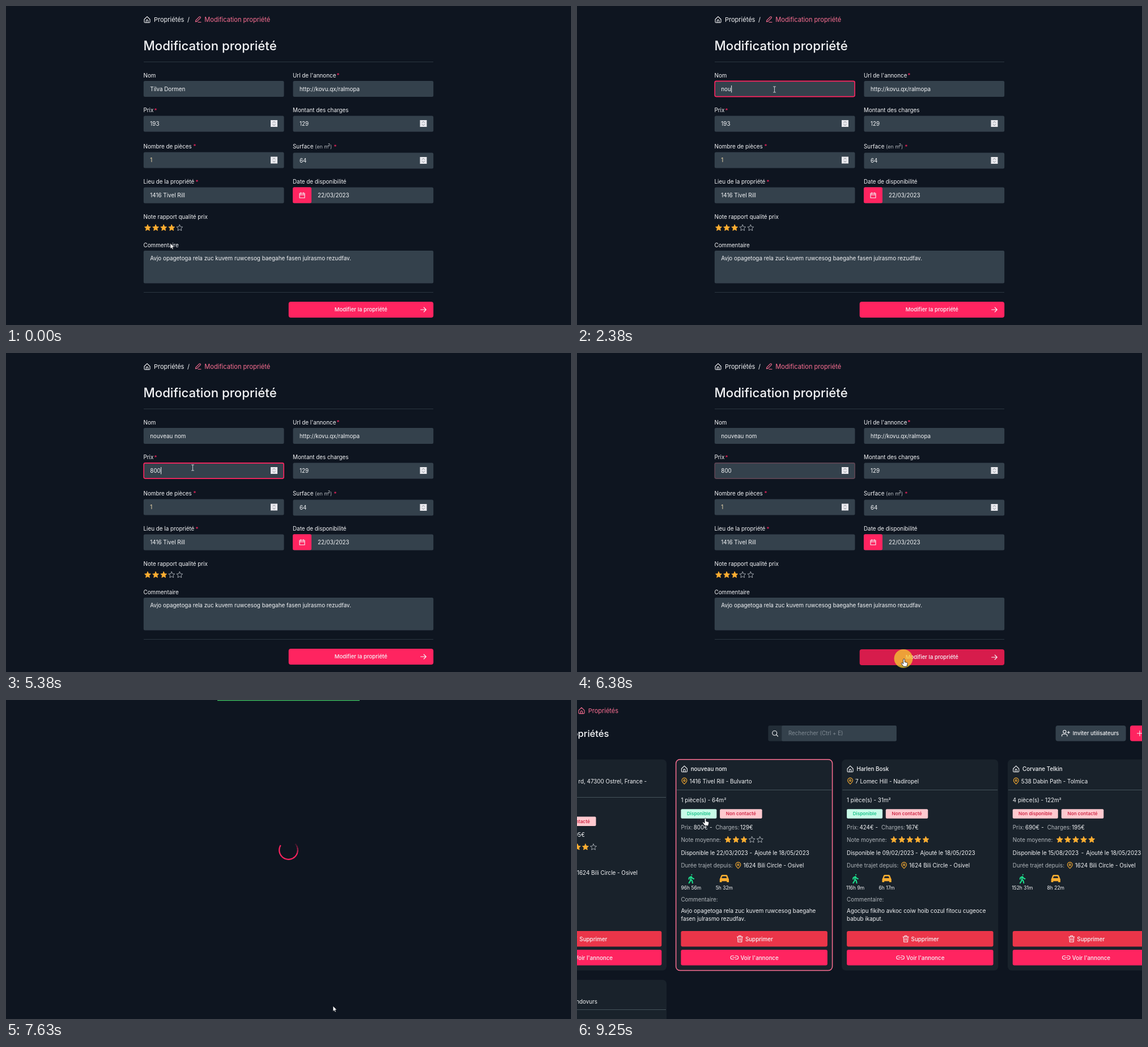
Recreate the animation shown at these times as an HTML page. Size 997x562 px, loop 9370 ms.

```html
<!DOCTYPE html>
<html lang="fr">
<head>
<meta charset="utf-8">
<title>Modification propriété</title>
<style>
  html, body { margin: 0; width: 100%; height: 100%; overflow: hidden; background: #0e1520; }
  svg { display: block; width: 997px; height: 562px; font-family: Inter, "Open Sans", sans-serif; }
</style>
</head>
<body>
<svg id="stage" viewBox="0 0 997 562"></svg>
<script>
const LOOP = 9370, STEP = 125;
const BG = '#0e1520', FIELD = '#34414c', PINK = '#ff2460', ROSE = '#fb6f92', WHITE = '#f4f5f7',
      GRAY = '#b0b5ba', GOLD = '#fcae31', GREEN = '#1edc8c', LINE = '#2b3640';
const SIZE = 9.85;
const NOTE = 'Avjo opagetoga rela zuc kuvem ruwcesog baegahe fasen julrasmo rezudfav.';
const PLACE = '1416 Tivel Rill', WORK = '1624 Bili Circle - Osivel';

const stage = document.getElementById('stage');
const pen = document.createElement('canvas').getContext('2d');
const widthOf = s => { pen.font = `${SIZE}px Inter, "Open Sans", sans-serif`; return pen.measureText(s).width; };

// ---- drawing helpers: y of a text is the middle of its capitals ----
const text = (x, y, s, { size = SIZE, fill = WHITE, weight = 400, anchor = 'start' } = {}) =>
  `<text x="${x}" y="${y + size * .36}" font-size="${size}" fill="${fill}" font-weight="${weight}" text-anchor="${anchor}">${s}</text>`;
const rect = (x, y, w, h, fill, r = 0, extra = '') =>
  `<rect x="${x}" y="${y}" width="${w}" height="${h}" rx="${r}" fill="${fill}" ${extra}/>`;
const line = (x1, x2, y, color = LINE) =>
  `<path d="M${x1} ${y}H${x2}" stroke="${color}"/>`;
const icon = (d, x, y, color = WHITE, fill = 'none', scale = 1, width = 1.1) =>
  `<path d="${d}" transform="translate(${x} ${y}) scale(${scale})" stroke="${color}" fill="${fill}" stroke-width="${width}" stroke-linecap="round" stroke-linejoin="round"/>`;

const HOME = 'M-5 -.5 0 -5.4 5 -.5V4a1.2 1.2 0 0 1-1.2 1.2H-3.8A1.2 1.2 0 0 1-5 4zM-1.6 5V2a1.6 1.6 0 0 1 3.2 0V5';
const PENCIL = 'M-4 1.6 2 -4.4a1.4 1.4 0 0 1 2 2L-2 3.6-4.6 4.3zM0 5H5';
const PIN = 'M0 5.2C-3 2.4-4.4 .8-4.4-1.2a4.4 4.4 0 0 1 8.8 0C4.4.8 3 2.4 0 5.2zM-1.5-1.1a1.5 1.5 0 1 0 3 0a1.5 1.5 0 1 0-3 0';
const CALENDAR = 'M-4.5-3.5h9v8h-9zM-4.5-.8h9M-2.3-5v2.4M2.3-5v2.4';
const ARROW_RIGHT = 'M-4.8 0H4.8M.8-4 4.8 0 .8 4';
const CHEVRONS = 'M-2-1.6 0-3.6 2-1.6M-2 1.6 0 3.6 2 1.6';
const GLASS = 'M3.2-.8a4 4 0 1 1-8 0a4 4 0 1 1 8 0M2.2 2.2 5 5';
const USER_PLUS = 'M1-2.8a2.6 2.6 0 1 1-5.2 0a2.6 2.6 0 1 1 5.2 0M-6.4 5V3.8A2.2 2.2 0 0 1-4.2 1.6H.8A2.2 2.2 0 0 1 3 3.8V5M3.4-1.6h4M5.4-3.6v4';
const TRASH = 'M-5-3.6H5M-4-3.6-3.3 5.4H3.3L4-3.6M-1.8-3.6V-5.6H1.8V-3.6M-1.3-1V3M1.3-1V3';
const LINK = 'M-1.5-3H-3.8a3 3 0 0 0 0 6H-1.5M1.5-3H3.8a3 3 0 0 1 0 6H1.5M-3 0H3';
const WALK = 'M0-3.6-.8 1 1.6 3.2 2.4 7M-1 2-1.6 4-3.6 7M0-3.6-3.2-2-3.8.4M.4-3.4 2-1 4.4 0M1-6.8v.1';
const CAR = 'M-8 1.2-7.2-.4-5.4-5A2 2 0 0 1-3.6-6.2H3.6A2 2 0 0 1 5.4-5L7.2-.4 8 1.2V6.4H5.2V4.4H-5.2V6.4H-8z';
const WINDSHIELD = 'M-4.6-1.4H4.6L3.4-4H-3.4z';

const STAR = 'M' + Array.from({ length: 10 }, (_, i) => {
  const a = i * Math.PI / 5 - Math.PI / 2, r = i % 2 ? 2.7 : 5.7;
  return `${(r * Math.cos(a)).toFixed(2)} ${(r * Math.sin(a)).toFixed(2)}`;
}).join('L') + 'z';
const stars = (x, y, n) => [0, 1, 2, 3, 4].map(i =>
  icon(STAR, x + i * 14.1, y, i < n ? GOLD : '#aeb4ba', i < n ? GOLD : 'none', 1, .9)).join('');

// ---- form page ----
function label(x, y, s, starX) {
  return text(x, y, s) + (starX ? text(starX, y + .5, '*', { fill: PINK, anchor: 'middle' }) : '');
}
function field(x, y, value, { border, color } = {}) {
  const edge = border ? rect(x + .4, y + .4, 246.9, 27.2, 'none', 2.5, `stroke="${border}" stroke-width="1.6"`) : '';
  return rect(x, y, 247.7, 28, FIELD, 2.5) + edge + text(x + 11.5, y + 14, value, { fill: color || WHITE });
}
const stepper = (x, y) => rect(x - 6, y - 6, 12, 12, '#e9e9ee') + icon(CHEVRONS, x, y, '#7b8088', 'none', 1, .9);
const caret = (x, y, s) => rect(x + widthOf(s) + .3, y - 6, 1, 12.5, WHITE);
const marked = (x, y, w) => rect(x, y - 6.5, w, 13, ROSE);

function nameField(k) {
  const full = 'nouveau nom', old = 'Tilva Dormen';
  const typed = k < 17 ? 0 : k < 28 ? Math.min(9, k - 16) : Math.min(11, k - 18);
  const value = typed ? full.slice(0, typed) : old;
  let s = field(242.8, 132, '', { border: k >= 9 && k < 37 ? PINK : '' });
  if (k >= 10 && !typed) {
    const from = k === 10 ? widthOf('Tilva ') : 0;
    s += marked(254.3 + from, 146.5, widthOf(old) - from);
  }
  s += text(254.3, 146, value);
  if (typed && (k < 26 || k === 28 || k === 29)) s += caret(254.3, 146, value);
  return s;
}
function priceField(k) {
  const value = k < 41 ? '193' : '800'.slice(0, k - 40);
  const border = k < 35 ? '' : k === 35 ? '#939ca3' : k < 51 ? PINK : k === 51 ? '#5d4453' : '';
  let s = field(242.8, 193.5, '', { border });
  if (k >= 36 && k < 41) s += marked(254.3, 207.5, widthOf(value));
  s += text(254.3, 207.5, value);
  if (k === 35 || (k > 40 && k < 46)) s += caret(254.3, 207, value);
  return s + stepper(473, 207);
}
function form(k) {
  const hover = k >= 49, by = hover ? 522 : 521;
  return icon(HOME, 249, 24) + text(261, 24, 'Propriétés', { size: 11 }) + text(320, 24, '/', { size: 11 }) +
    icon(PENCIL, 339, 23.5, ROSE) + text(350.3, 24, 'Modification propriété', { size: 11.1, fill: ROSE }) +
    text(242.5, 70, 'Modification propriété', { size: 22.2, weight: 500 }) + line(243, 754, 98.5) +
    label(242.5, 122, 'Nom') + nameField(k) +
    label(506, 122, 'Url de l\'annonce', 586) + field(506.5, 132, 'http://kovu.qx/ralmopa') +
    label(242.5, 183.5, 'Prix', 264) + priceField(k) +
    label(506, 183.5, 'Montant des charges') + field(506.5, 193.5, '129') + stepper(736.5, 207) +
    label(242.5, 247, 'Nombre de pièces', 333) + field(242.8, 257.5, '1', { color: '#f3dfb0' }) + stepper(473, 271.5) +
    label(506, 247.5, 'Surface', 581) + text(545, 247.5, '(en m', { size: 9, fill: GRAY }) +
    text(568, 244.5, '2', { size: 6.5 }) + text(572, 247.5, ')', { size: 9, fill: GRAY }) +
    field(506.5, 258.5, '64') + stepper(736.5, 272) +
    label(242.5, 309.5, 'Lieu de la propriété', 337) + field(242.8, 319.5, PLACE) +
    label(506, 309.5, 'Date de disponibilité') + field(506.5, 319.5, '') + rect(506, 319.3, 33, 28, PINK, 2.5) +
    icon(CALENDAR, 522.5, 333.5) + text(550, 333.5, '22/03/2023') +
    label(242.5, 371, 'Note rapport qualité prix') + stars(250, 391, k < 3 ? 4 : 3) +
    label(242.5, 421, 'Commentaire') + rect(242.8, 431, 511.4, 57.5, FIELD, 2.5) + text(254.3, 444.5, NOTE) +
    line(243, 754, 504.5) + rect(498.7, by, 255.5, 28, hover ? '#d71c4c' : PINK, 4) +
    text(626.3, by + 14, 'Modifier la propriété', { size: 9.6, weight: 500, anchor: 'middle' }) +
    icon(ARROW_RIGHT, 736.5, by + 14);
}

// ---- waiting page ----
function loader(k) {
  const point = a => `${498.5 + 16.3 * Math.cos(a)} ${264.5 + 16.3 * Math.sin(a)}`;
  const turn = (k - 61) * Math.PI / 4;
  let s = '';
  for (let i = 0; i < 17; i++) {
    const a = turn + (i * 15 - 43) * Math.PI / 180;
    s += `<path d="M${point(a)}A16.3 16.3 0 0 1 ${point(a + .265)}" fill="none" stroke="${PINK}" stroke-width="2.2" opacity="${Math.min(1, (i + 1) / 5)}"/>`;
  }
  return s + (k === 61 ? rect(373, 0, 251, 1.3, '#3fc463') : '');
}

// ---- list page ----
function badge(x, y, w, s, good) {
  return rect(x, y - 8.2, w, 16.4, good ? '#c8fbe8' : '#ffc9cf', 2) +
    text(x + w / 2, y, s, { size: 8.2, weight: 600, anchor: 'middle', fill: good ? '#1cc48c' : '#cf2a48' });
}
function cardBox(x, y, h, headY, border = 0) {
  return rect(x, y, 276, h, '#19222b', 7) +
    (border ? rect(x, y, 276, h, 'none', 7, `stroke="${ROSE}" stroke-width="1.5" opacity="${border}"`) : '') +
    line(x + 1, x + 275, headY, '#45535b');
}
function actions(x) {
  return rect(x, 407, 258.5, 27.5, '#ea3549', 3) + icon(TRASH, x + 104, 420.8) +
    text(x + 113.5, 421, 'Supprimer', { size: 9.8, weight: 500 }) +
    rect(x, 440, 258.5, 27.5, PINK, 3) + icon(LINK, x + 94.5, 453.8) +
    text(x + 105, 454, 'Voir l\'annonce', { size: 9.8, weight: 500 });
}
function card(left, c, border) {
  const x = left + 8.8, gray = { fill: GRAY };
  const small = { size: 8.5, anchor: 'middle' };
  return cardBox(left, 104.7, 371.8, 158.5, border) +
    icon(HOME, x + 6, 121.5) + text(x + 17.3, 121.5, c.name, { weight: 500 }) +
    icon(PIN, x + 6, 143, GOLD) + text(x + 15, 143, c.place) +
    text(x, 176, c.size) +
    badge(x, 200.5, c.free ? 63 : 80, c.free ? 'Disponible' : 'Non disponible', c.free) +
    badge(x + (c.free ? 68.7 : 86), 200.5, 74.5, 'Non contacté') +
    text(x, 224, 'Prix:', gray) + text(x + 22.3, 224, c.price + '€') + text(x + 50.5, 224, '-') +
    text(x + 61, 224, 'Charges:', gray) + text(x + 104.5, 224, c.fees + '€') +
    text(x, 246, 'Note moyenne:', gray) + stars(x + 83, 246.3, c.rate) +
    text(x, 269, 'Disponible le ' + c.date) + text(x + 121, 269, '-') + text(x + 129.5, 269, 'Ajouté le 18/05/2023') +
    text(x, 291.5, 'Durée trajet depuis:', gray) + icon(PIN, x + 101, 291.5, GOLD) + text(x + 110, 291.5, WORK) +
    icon(WALK, x + c.walkX, 315, GREEN, 'none', 1.05, 2) + text(x + c.walkX, 331, c.walk, small) +
    icon(CAR, x + c.carX, 314.5, GOLD, GOLD, .95) + icon(WINDSHIELD, x + c.carX, 314.5, '#19222b', '#19222b', .85) +
    text(x + c.carX, 331, c.drive, small) +
    (c.note ? text(x, 351.5, 'Commentaire:', gray) : '') +
    (c.note || []).map((s, i) => text(x, 371.5 + i * 14.3, s)).join('') + actions(x);
}
const CARDS = [
  { name: 'nouveau nom', place: PLACE + ' - Bulvarto', size: '1 pièce(s) - 64m²', free: true, price: 800, fees: 129, rate: 3,
    date: '22/03/2023', walk: '96h 56m', drive: '5h 32m', walkX: 18, carX: 76.5,
    note: [NOTE.slice(0, 46), NOTE.slice(47)] },
  { name: 'Harlen Bosk', place: '7 Lomec Hill - Nadiropel', size: '1 pièce(s) - 31m²', free: true, price: 424, fees: 167, rate: 5,
    date: '09/02/2023', walk: '116h 9m', drive: '6h 17m', walkX: 15, carX: 70.5,
    note: ['Agocipu fikiho avkoc coiw hoib cozul fitocu cugeoce', 'babub ikaput.'] },
  { name: 'Corvane Telkin', place: '538 Dabin Path - Tolmica', size: '4 pièce(s) - 122m²', free: false, price: 690, fees: 195, rate: 5,
    date: '15/08/2023', walk: '152h 31m', drive: '8h 22m', walkX: 17, carX: 76 }
];
function list(k) {
  const end = { anchor: 'end' };
  const glow = k >= 74 ? 1 : k >= 72 ? .4 : 0;
  return icon(HOME, 8, 18.7, ROSE) + text(19.7, 18.7, 'Propriétés', { size: 11, fill: ROSE }) +
    text(56.5, 59, 'Propriétés', { size: 16.6, weight: 500, anchor: 'end' }) +
    rect(337.3, 45, 226.5, 27.5, '#222d37', 3) + rect(361.3, 45, 202.5, 27.5, FIELD, 2) + icon(GLASS, 349.5, 59) +
    text(373, 58.7, 'Rechercher (Ctrl + E)', { size: 9.7, fill: '#808b94' }) +
    rect(844.6, 45, 124, 27.5, FIELD, 4) + icon(USER_PLUS, 862, 58.7) +
    text(874.7, 58.7, 'Inviter utilisateurs', { size: 9.6, weight: 500 }) +
    rect(976, 45, 60, 27.5, PINK, 4) + icon('M-4.5 0H4.5M0-4.5V4.5', 993, 58.7) +
    cardBox(-118, 104.7, 371.8, 171.5) + text(123, 143, 'rd, 47300 Ostrel, France -', end) +
    badge(-41, 213.7, 74.5, 'Non contacté') + text(13.7, 237, '195€', end) + stars(-27.4, 259.3, 4) +
    text(0, 304.7, WORK) + actions(-109.2) +
    cardBox(-118, 493, 200, 545.5) + text(36, 531, 'Andovurs', end) +
    CARDS.map((c, i) => card(174.6 + i * 292.7, c, i ? 0 : glow)).join('');
}

// ---- pointer: [step, x, y] ----
const PATH = [[0, 290, 418], [2, 279, 391], [4, 279, 391], [8, 348, 147], [32, 348, 147], [35, 329, 202],
  [45, 329, 202], [49, 577, 539], [61, 577, 539], [68, 226.5, 208.3], [75, 226.5, 208.3]];
const CLICKS = [[3, 4], [9, 13], [35, 38], [50, 52]];
const HAND = 'M0 0c.9 0 1.3.6 1.3 1.3v3.8l3.3.9c1 .3 1.5 1 1.3 2l-.8 3.4c-.2.8-.6 1.3-1.2 1.3H0c-.6 0-1-.3-1.4-.8l-3-4c-.6-1 .6-1.9 1.5-1.2l1.6 1.4V1.3C-1.3.6-.9 0 0 0z';
const ARROW = 'M0 0V10.2L2.3 8.1 3.9 11.6 5.6 10.8 4.1 7.4H7.2z';
const BEAM = 'M-2-5H-.6L0-4.4.6-5H2M0-4.4V4.4M-2 5H-.6L0 4.4.6 5H2';

function pointer(k) {
  const i = Math.max(1, PATH.findIndex(p => p[0] >= k));
  const [a, b] = [PATH[i - 1], PATH[i]];
  const u = (k - a[0]) / (b[0] - a[0]), e = u * u * (3 - 2 * u);
  const x = a[1] + (b[1] - a[1]) * e, y = a[2] + (b[2] - a[2]) * e;
  const click = CLICKS.find(c => k >= c[0] && k <= c[1]);
  const ring = click
    ? `<circle cx="${x - 1}" cy="${y - .7}" r="16.4" fill="#f5cd32" opacity="${click.includes(k) ? .64 : .75}"/>` : '';
  if (k >= 8 && k < 46) return ring + icon(BEAM, x + .5, y, click ? '#6f6c50' : '#c3c8cc');
  const hand = (k >= 2 && k < 6) || (k >= 49 && k < 53) || k >= 67;
  return ring + `<path d="${hand ? HAND : ARROW}" transform="translate(${x} ${y}) scale(${hand ? 1.05 : .95})" fill="#fff" stroke="#10151c" stroke-width=".8" stroke-linejoin="round"/>`;
}

let shown = -1;
function draw(now) {
  const k = Math.min(74, Math.floor((now % LOOP) / STEP));
  if (k !== shown) {
    shown = k;
    const page = k < 53 ? form(k) : k < 62 ? loader(k) : list(k);
    stage.innerHTML = rect(0, 0, 997, 562, BG) + page + pointer(k);
  }
  requestAnimationFrame(draw);
}
draw(0);
</script>
</body>
</html>
```
